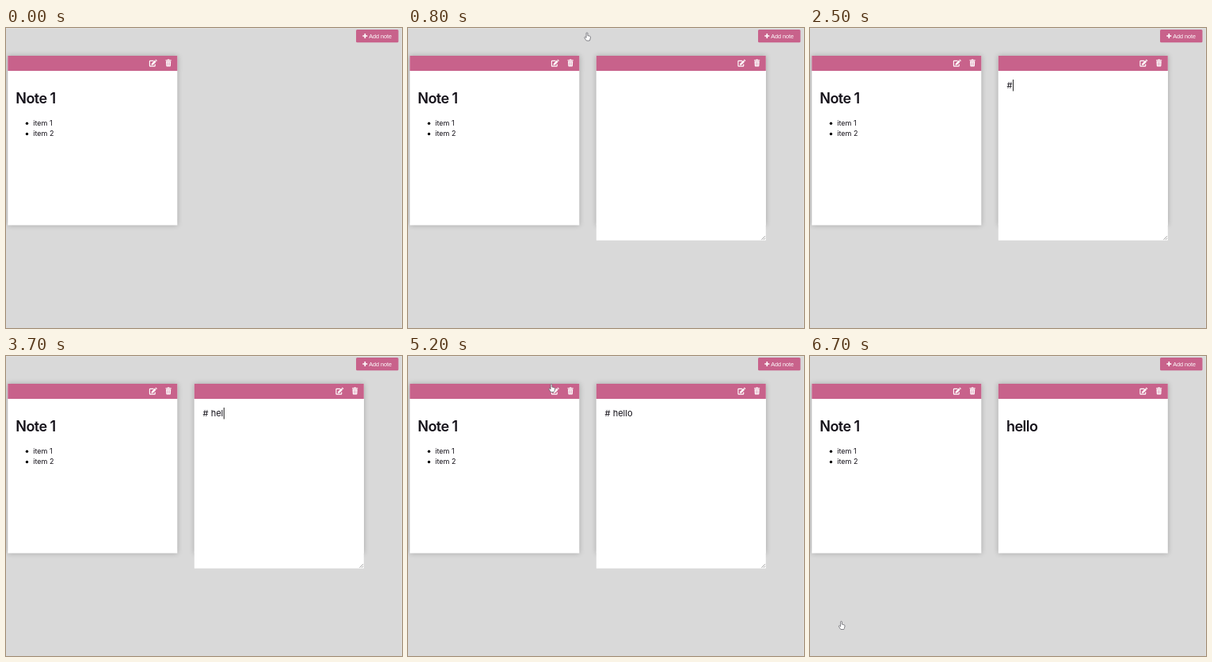
Recreate the animation shown at these times as an HTML page. Size 500 px wide and 378 px high, loop 6800 ms.

```html
<!DOCTYPE html>
<html lang="en">
<head>
<meta charset="utf-8">
<title>Notes</title>
<style>
  html, body { margin: 0; width: 100%; height: 100%; overflow: hidden; background: #d9d9d9; }
  svg { display: block; width: 500px; height: 378px; }
  text { font-family: Inter, "Open Sans", sans-serif; fill: #15121a; white-space: pre; }
  .title { font-size: 18px; font-weight: 600; letter-spacing: -.55px; }
  .item { font-size: 9px; }
  .typed { font-size: 11px; }
  .label { font: 7.2px "Liberation Sans", Arial, sans-serif; fill: #fff; }
  .card { filter: drop-shadow(0 0 3px rgba(0, 0, 0, .24)); }
  .pink { fill: #c8628b; }
  .cursor { fill: #fff; stroke: #55555c; stroke-width: .7; stroke-linejoin: round; }
</style>
</head>
<body>
<svg viewBox="0 0 500 378">
  <defs>
    <g id="edit">
      <path d="M5.6 1.6H1.2Q.6 1.6 .6 2.2V7.8Q.6 8.4 1.2 8.4H6.8Q7.4 8.4 7.4 7.8V5.9" fill="none" stroke="#fff" stroke-width="1.15"/>
      <path d="M3 5.1L7 1.1L8.8 2.9L4.8 6.9L2.7 7.2ZM7.5 .6L8.1 .1Q8.5-.2 8.9.2L9.8 1.1Q10.1 1.5 9.8 1.8L9.3 2.4Z" fill="#fff"/>
    </g>
    <g id="trash">
      <path d="M0 .7H2.1L2.6 0H4.6L5.1 .7H7.2V1.7H0ZM.5 2.3H6.7L6.4 8.3Q6.3 9 5.7 9H1.5Q.9 9 .8 8.3Z" fill="#fff"/>
      <path d="M2.2 3.3V7.9M3.6 3.3V7.9M5 3.3V7.9" stroke="#c8628b" stroke-width=".45"/>
    </g>
    <g id="card">
      <g class="card">
        <rect width="214" height="213.5" fill="#fff"/>
        <rect class="pink" width="214" height="19"/>
      </g>
      <use href="#edit" x="178.5" y="4.7"/>
      <use href="#trash" x="199.2" y="4.5"/>
    </g>
  </defs>

  <rect width="500" height="378" fill="#d9d9d9"/>
  <path d="M0 .5H499.5V378" fill="none" stroke="#e0e0e0"/>

  <rect class="pink" x="442" y="2" width="53.5" height="16.3" rx="1.5"/>
  <path d="M453.3 7V13M450.3 10H456.3" stroke="#fff" stroke-width="1.6"/>
  <text class="label" x="458.2" y="12.5">Add note</text>

  <use href="#card" x="2.3" y="35"/>
  <text class="title" x="12.3" y="95">Note 1</text>
  <circle cx="26.5" cy="120.2" r="1.7"/>
  <circle cx="26.5" cy="133.5" r="1.7"/>
  <text class="item" x="34.3" y="123">item 1</text>
  <text class="item" x="34.3" y="136.3">item 2</text>

  <g id="second">
    <use href="#card" x="237.8" y="35"/>
    <g id="editor">
      <rect x="237.8" y="54" width="214" height="213.6" fill="#fff"/>
      <path d="M446.5 266.7L451 262.2M449 266.7L451 264.7" stroke="#777" stroke-width=".7"/>
      <text id="typed" class="typed" x="248.6" y="76.2"></text>
      <rect id="caret" y="65" width="1" height="14.5" fill="#222"/>
    </g>
    <text id="heading" class="title" x="248" y="95">hello</text>
  </g>

  <path id="hand" class="cursor" d="M-.9 5.2V.6Q-.9-.2 0-.2T.9 .6V3.6L3.4 4.2Q4.6 4.5 4.5 5.7L4 8Q3.8 9 3.2 10H-.6Q-1.6 8.8-3 6.6Q-3.5 5.6-2.7 5.3Q-2 5-.9 6.4Z"/>
  <path id="arrow" class="cursor" d="M0 0V7.2L1.6 5.8L2.6 8.2L3.8 7.7L2.8 5.4H5Z"/>
</svg>
<script>
const LOOP = 6800, STEP = 100;
const $ = id => document.getElementById(id);

// [time, mode, text, caret shown]
const states = [
  [0, 'none', '', 0],
  [800, 'edit', '', 0],
  [1300, 'edit', '', 1],
  [1800, 'edit', '', 0],
  [2300, 'edit', '', 1],
  [2500, 'edit', '#', 1],
  [3000, 'edit', '#', 0],
  [3200, 'edit', '# ', 1],
  [3400, 'edit', '# he', 1],
  [3700, 'edit', '# hel', 1],
  [3800, 'edit', '# hell', 1],
  [4000, 'edit', '# hello', 1],
  [4500, 'edit', '# hello', 0],
  [5300, 'view', '', 0]
];

// [time, shape, x, y]; positions glide to the next row
const moves = [
  [0, '', 0, 0],
  [200, 'arrow', 150, 134],
  [600, 'hand', 226, 6],
  [800, 'hand', 226, 6],
  [900, 'arrow', 210, 24],
  [1100, '', 130, 110],
  [4900, 'arrow', 120, 125],
  [5200, 'hand', 181, 35.5],
  [5300, 'hand', 181, 35.5],
  [5700, 'hand', 181, 35.5],
  [5800, 'arrow', 197, 25],
  [6000, 'arrow', 197, 25],
  [6100, 'arrow', 194, 32],
  [6200, 'arrow', 194, 32],
  [6600, 'arrow', 52, 318],
  [6700, 'hand', 39.5, 334.5]
];

const indexAt = (rows, t) => rows.findLastIndex(r => r[0] <= t);
const show = (id, on) => $(id).setAttribute('visibility', on ? 'visible' : 'hidden');

function drawNote(t) {
  const [, mode, text, caret] = states[indexAt(states, t)];
  show('second', mode !== 'none');
  show('editor', mode === 'edit');
  show('heading', mode === 'view');
  show('caret', caret);
  const typed = $('typed');
  typed.textContent = text;
  $('caret').setAttribute('x', 249.1 + (text ? typed.getComputedTextLength() : 0));
}

function drawCursor(t) {
  const i = indexAt(moves, t);
  const [t0, shape, x0, y0] = moves[i];
  const [t1, , x1, y1] = moves[i + 1] || [LOOP, '', x0, y0];
  const k = (t - t0) / (t1 - t0);
  for (const id of ['hand', 'arrow']) {
    show(id, id === shape);
    $(id).setAttribute('transform', `translate(${x0 + (x1 - x0) * k} ${y0 + (y1 - y0) * k})`);
  }
}

let start, last = -1;
function frame(now) {
  start ??= now;
  const t = Math.floor((now - start) % LOOP / STEP) * STEP;
  if (t !== last) {
    drawNote(t);
    drawCursor(t);
    last = t;
  }
  requestAnimationFrame(frame);
}
drawNote(0);
drawCursor(0);
requestAnimationFrame(frame);
</script>
</body>
</html>
```
